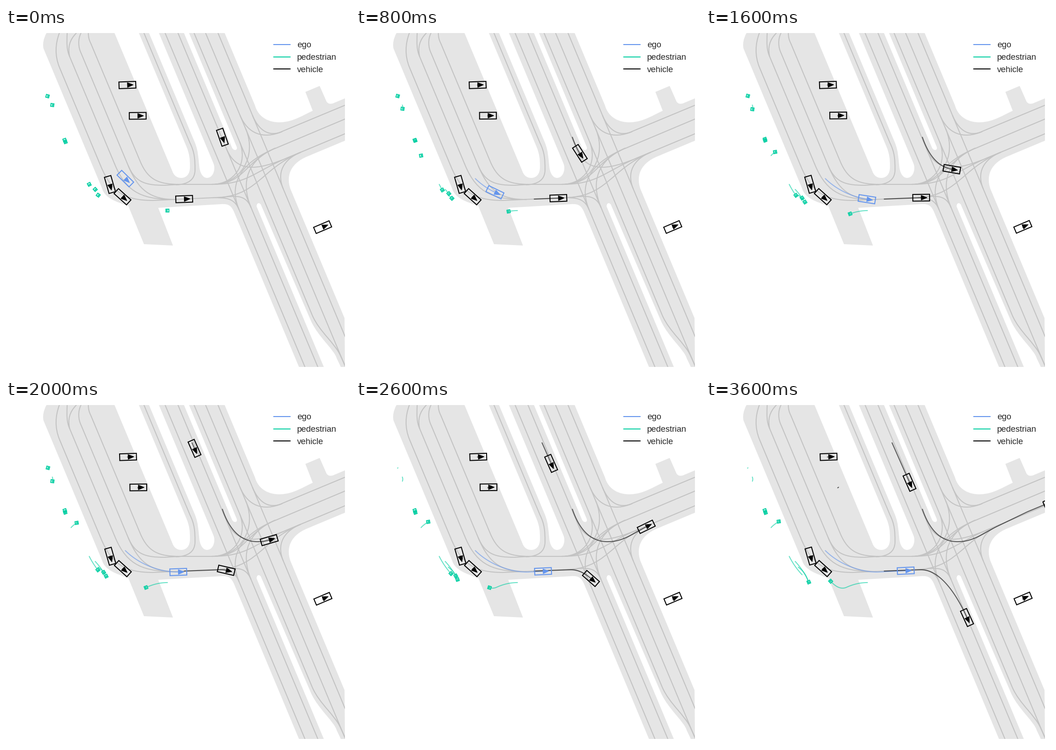
Animation of 748x748 px, one loop 3800 ms. Source, as a matplotlib script:

```python
import numpy as np
import matplotlib.pyplot as plt
from matplotlib.animation import FuncAnimation
from matplotlib.lines import Line2D
from matplotlib.patches import PathPatch, Polygon
from matplotlib.path import Path

SIZE, DPI = 748, 100
LO, HI = 11, 737
FRAMES, STEP = 19, 200
ROAD, LANE = "#e5e5e5", "#c3c3c3"
EGO, PED, CAR = "#6495ed", "#05cfa3", "#000000"
LW = 1.5

# All main roads share one slant; the side road crosses them at a right angle.
SLANT = 2.388
SOUTH = np.array([1, SLANT]) / np.hypot(1, SLANT)
EAST = np.array([SLANT, -1]) / np.hypot(1, SLANT)
FLAT = np.array([1.0, 0.0])

plt.rcParams["font.family"] = "Liberation Sans"
plt.rcParams["lines.solid_capstyle"] = "round"

fig = plt.figure(figsize=(SIZE / DPI, SIZE / DPI), dpi=DPI, facecolor="white")
span = (HI - LO) / SIZE
ax = fig.add_axes([LO / SIZE, LO / SIZE, span, span])
ax.set_xlim(LO, HI)
ax.set_ylim(HI, LO)
ax.axis("off")


def down(x, y):
    """Point at height y on the slanted line that starts at x on the top edge."""
    return x + (y - LO) / SLANT, y


def across(y, x):
    """Point at x on the side-road line that ends at y on the right edge."""
    return x, y + (HI - x) / SLANT


def make_path(*parts):
    """Pairs are line points, 4-tuples quadratic and 6-tuples cubic curves."""
    verts, codes = [], []
    kinds = {2: Path.LINETO, 4: Path.CURVE3, 6: Path.CURVE4}
    for part in parts:
        verts += zip(part[::2], part[1::2])
        codes += [kinds[len(part)]] * (len(part) // 2)
    codes[0] = Path.MOVETO
    return Path(verts, codes)


def turn(a, way_in, b, way_out, reach=0.45):
    """Cubic from a to b that leaves and arrives along the given directions."""
    pull = reach * np.hypot(b[0] - a[0], b[1] - a[1])
    return (*(a + pull * way_in), *(b - pull * way_out), *b)


def area(color, *parts):
    ax.add_patch(PathPatch(make_path(*parts), fc=color, ec="none", lw=0, zorder=1))


def lane(*parts):
    ax.add_patch(PathPatch(make_path(*parts), fc="none", ec=LANE, lw=LW,
                           capstyle="round", zorder=2))


def draw_roads():
    area(ROAD, (88, LO), (475.5, LO), down(475.5, 168),
         (549, 195, 572, 206, 597, 205), (625, 204, 645, 190, 667, 180),
         (651, 139), (682, 126), (697, 160), (701, 167) + across(153, 711),
         across(153, HI), across(245, HI), across(245, 655),
         (622, 293, 608, 318) + down(476.5, 349), down(476.5, 631),
         (HI, HI), down(333, HI), down(333, 402),
         (490, 386, 484, 382, 468, 383), (331, 391), (363, 473), (300, 470),
         (266, 387), (240, 378, 215, 370) + down(67.5, 349),
         down(67.5, 45), (79, 35, 82, 22, 88, LO))
    # islands between the roads
    area("white", (236, LO), down(236, 311), (365, 321, 372, 326, 381, 326),
         (392, 326, 400, 318, 400, 302), (400, 284, 399, 274) + down(289, 258),
         (289, LO))
    area("white", (311, LO), down(311, 250), (418, 268, 418, 280, 420, 298),
         (421, 315, 428, 326, 437, 326), (446, 326, 453, 317, 453, 304),
         (453, 297, 450, 292) + down(332.5, 285), (332.5, LO))
    # median, open at the crossing
    area("white", (387, LO), down(387, 259), (494, 268, 505, 267) + down(398, 258),
         (398, LO))
    area("white", down(387, HI), down(387, 388), (545, 379, 552, 379) + down(398, 385),
         down(401, 638), (680, 673, 714, 700, 719, 718), (728, HI))


def draw_lanes():
    # tops of the loop lanes, then their bends into the street below
    lane((116, LO), (107, 35, 106, 60) + down(85, 85), down(85, 302),
         turn(down(85, 302), SOUTH, (320, 375), FLAT), (450, 369))
    lane((133, LO), (132, 35, 132, 48) + down(117, 62), down(117, 299),
         turn(down(117, 299), SOUTH, (370, 373), FLAT))
    lane((153, LO), (138, 26, 134, 42) + down(117, 62))
    lane((163, LO), (156, 25, 157, 42) + down(145, 55), down(145, 299),
         turn(down(145, 299), SOUTH, (345, 342), FLAT), (378, 340), (448, 340))
    lane(down(145, 299), turn(down(145, 299), SOUTH, (370, 373), FLAT))
    lane((179, LO), (179, 20, 181, 27) + down(175, 33), down(175, 290),
         turn(down(175, 290), SOUTH, (378, 340), FLAT))
    lane((300, LO), down(300, 250), (410, 270, 411, 285, 411, 308),
         (411, 330, 396, 340, 370, 341))

    for x in (346, 374, 434, 461):
        lane((x, LO), down(x, HI))
    lane((409, LO), down(409, 625), (682, 661, 715, 685, 727, 712), (HI, 733))
    lane((600, 225), across(168, HI))
    lane((585, 262), across(198, HI))
    lane((610, 283), across(230, HI))

    upper, lower = (448, 340), (450, 369)
    side = across(198, 585)
    for a, way_in, b, way_out in (
            (down(374, 263), SOUTH, across(230, 640), EAST),
            (down(434, 190), SOUTH, across(168, 600), EAST),
            (down(461, 190), SOUTH, across(168, 600), EAST),
            (down(461, 350), -SOUTH, across(230, 640), EAST),
            (side, -EAST, down(374, 390), SOUTH),
            (side, -EAST, down(346, 395), SOUTH),
            (side, -EAST, upper, -FLAT),
            (down(409, 247), SOUTH, upper, -FLAT),
            (down(434, 220), SOUTH, upper, -FLAT),
            (upper, FLAT, across(230, 610), EAST),
            (lower, FLAT, across(230, 640), EAST),
            (lower, FLAT, down(346, 395), SOUTH),
            (lower, FLAT, down(374, 390), SOUTH)):
        lane(a, turn(a, way_in, b, way_out))


def ease(start, end, power=1):
    """Share of the way covered from start to end, slowing for power > 1."""
    return lambda t: 1 - (1 - np.clip((t - start) / (end - start), 0, 1)) ** power


def drive(*keys):
    """Smooth share of the way from (time, distance) keys."""
    times, dist = np.array(keys, float).T
    dist /= dist[-1]
    slope = np.gradient(dist, times, edge_order=2)

    def share(t):
        i = np.clip(np.searchsorted(times, t, "right") - 1, 0, len(times) - 2)
        h = times[i + 1] - times[i]
        s = (t - times[i]) / h
        p, q, m, n = dist[i], dist[i + 1], slope[i] * h, slope[i + 1] * h
        return (p + s * m + s**2 * (3 * (q - p) - 2 * m - n)
                + s**3 * (2 * (p - q) + m + n))
    return share


class Agent:
    """Box with a heading mark that follows a path and leaves a trail."""

    def __init__(self, color, size, way, pace, first=0, last=FRAMES, deg=None):
        self.pace, self.first, self.last, self.deg = pace, first, last, deg
        u = np.linspace(0, 1, 60)
        self.pts = np.vstack([seg(u) for seg, code in make_path(*way).iter_bezier()
                              if code != Path.MOVETO])
        steps = np.hypot(*np.diff(self.pts, axis=0).T)
        self.dist = np.append(0, np.cumsum(steps))
        a, b = size[0] / 2, size[1] / 2
        self.box_shape = np.array([(-a, -b), (a, -b), (a, b), (-a, b)])
        self.mark_shape = np.array([(0, -0.72 * b), (0.7 * a, 0), (0, 0.72 * b)])
        self.trail, = ax.plot([], [], color=color, lw=LW, alpha=0.6, zorder=3)
        self.box = Polygon(self.box_shape, fc="none", ec=color, lw=LW, zorder=4)
        self.mark = Polygon(self.mark_shape, fc=color, ec=color, lw=0.7, zorder=4)
        ax.add_patch(self.box)
        ax.add_patch(self.mark)

    def point(self, d):
        return np.array([np.interp(d, self.dist, c) for c in self.pts.T])

    def show(self, frame):
        begun = frame >= self.first
        self.trail.set_visible(begun)
        for patch in (self.box, self.mark):
            patch.set_visible(begun and frame <= self.last)
        total = self.dist[-1]
        d = total * self.pace(min(max(frame, self.first), self.last))
        self.trail.set_data(*self.point(np.linspace(0, d, 80)))
        if self.deg is None:
            dx, dy = self.point(min(d + 1, total)) - self.point(max(min(d, total) - 1, 0))
            angle = np.arctan2(dy, dx)
        else:
            angle = np.radians(self.deg)
        c, s = np.cos(angle), np.sin(angle)
        rot = np.array([(c, s), (-s, c)])
        self.box.set_xy(self.box_shape @ rot + self.point(d))
        self.mark.set_xy(self.mark_shape @ rot + self.point(d))


def car(way, pace, color=CAR, **options):
    return Agent(color, (36.5, 14.5), way, pace, **options)


def parked(x, y, deg, dx, dy, **options):
    """Standing car whose measured place drifts a little."""
    return car([(x, y), (x + dx, y + dy)], ease(0, FRAMES - 1), deg=deg, **options)


def walker(way, start, end, power=1, **options):
    return Agent(PED, (6.4, 6.2), way, ease(start, end, power), **options)


draw_roads()
draw_lanes()

agents = [
    car([(259.5, 327.5), (290, 358, 337, 375, 374.5, 374), (434.3, 371.2)],
        drive((0, 0), (6, 77.5), (13, 160), (16, 183.5), (18, 187.7)), color=EGO),
    car([(387.5, 372), (468, 369), (503, 369, 538.5, 409, 567.5, 473)],
        drive((0, 0), (6, 70.5), (10, 91), (18, 230))),
    car([(470.5, 237.5), (481, 268, 502, 310, 550, 308),
         (580, 308, 605, 289, 630.5, 276), (699, 243), (752, 221)],
        drive((0, 0), (6, 66.5), (10, 138), (18, 337))),
    car([(404.5, 93), (442.5, 179)], drive((9, 0), (13, 49), (18, 94)), first=9),
    parked(226, 340.3, 74, 1.4, -1),
    parked(253.3, 366.9, 42, 1.4, -0.4),
    parked(264, 124, -2, 2.6, -0.4),
    parked(286.4, 191, -0.5, 2.4, -1.7, last=14),
    parked(688.5, 433, -23, 1, -1.4),
    walker([(90.3, 148.2), (91.3, 147.5)], 0, 11, last=11, deg=15),
    walker([(100.7, 167.5), (102.5, 172, 100.9, 176.6)], 0, 6, 2, last=11, deg=8),
    walker([(127.6, 243.8), (129.4, 245)], 0, 18, deg=70),
    walker([(129.2, 247.6), (128, 240.2)], 0, 10, deg=70),
    walker([(141.5, 277.5), (146, 272, 158.2, 264.2)], 4, 16, 2, first=4, deg=-10),
    walker([(181, 340), (192, 362, 209, 380)], 0, 14, last=14),
    walker([(194, 351), (214, 373, 223.5, 396)], 0, 18),
    walker([(200.5, 363.5), (218, 376, 222, 395.5)], 0, 15, last=15),
    walker([(351, 397), (328, 397, 305, 407.5), (289, 414, 271, 394)], 0, 18),
]
agents[2].last = 18

handles = [Line2D([], [], color=c, lw=LW, label=name)
           for c, name in ((EGO, "ego"), (PED, "pedestrian"), (CAR, "vehicle"))]
ax.legend(handles=handles, loc="upper right", frameon=False, fontsize=13.2,
          borderaxespad=0.6, labelspacing=0.53, labelcolor="#262626")


def update(frame):
    for agent in agents:
        agent.show(frame)
    return []


anim = FuncAnimation(fig, update, frames=FRAMES, init_func=lambda: update(0),
                     interval=STEP, repeat=True, repeat_delay=0, blit=False)
plt.show()
```
